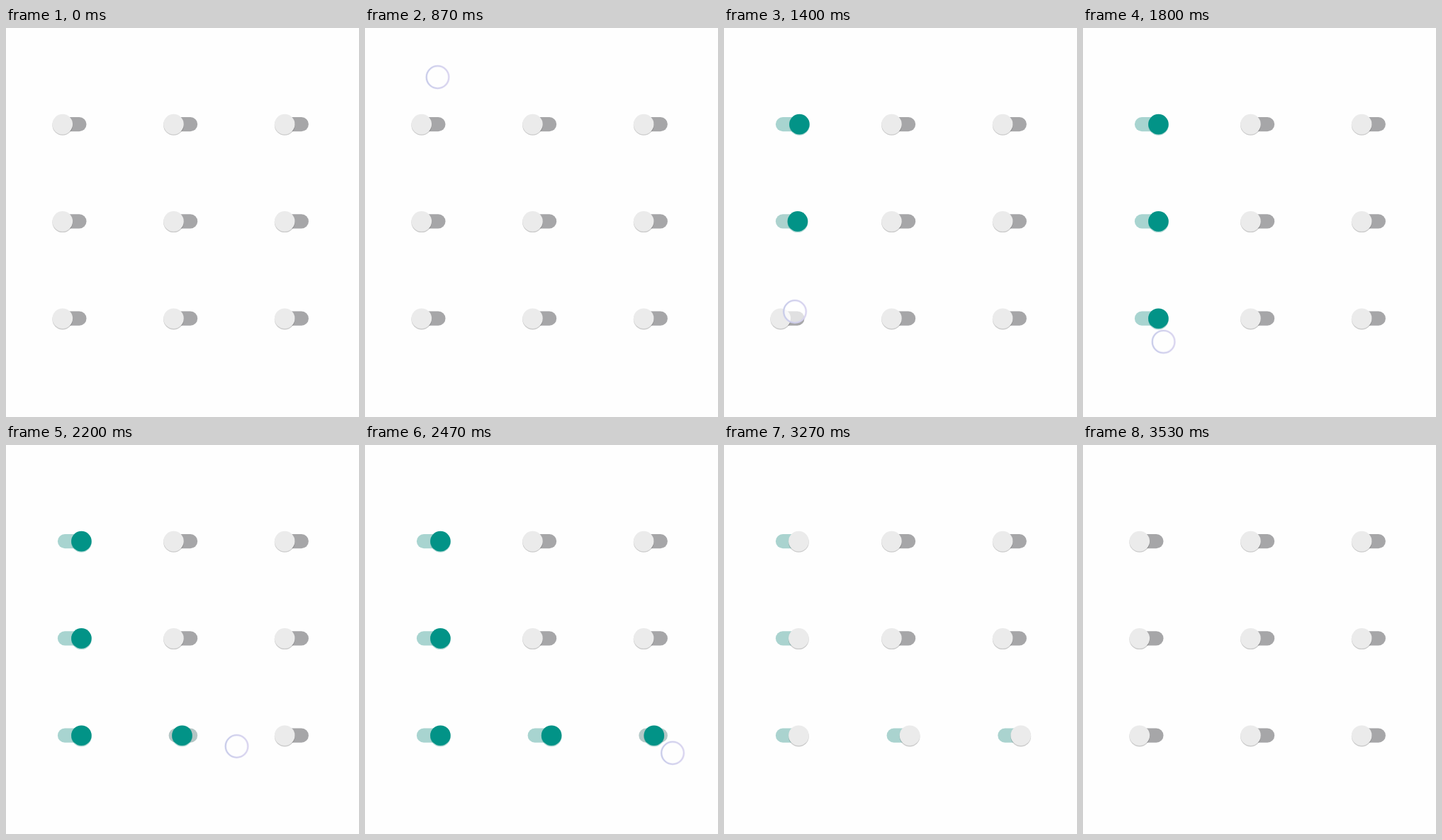
An HTML page with a canvas for the animation above (3.59 s loop, 498 by 550 pixels).

```html
<!DOCTYPE html>
<html lang="en">
<head>
<meta charset="utf-8">
<title>Toggle switches</title>
<style>
  html, body { margin: 0; width: 100%; height: 100%; overflow: hidden; background: #fefefe; }
  canvas { display: block; width: 498px; height: 550px; }
</style>
</head>
<body>
<canvas></canvas>
<script>
const W = 498, H = 550, LOOP = 3590, STEP = 1000 / 15;
const SLIDE = 250, RESET = 3235;

const canvas = document.querySelector('canvas');
const ctx = canvas.getContext('2d');
const ratio = window.devicePixelRatio || 1;
canvas.width = W * ratio;
canvas.height = H * ratio;
ctx.scale(ratio, ratio);

// Switch-on times by row and column; null stays off
const onTimes = [
  [1020, null, null],
  [1199, null, null],
  [1450, 2083, 2334]
];

// Pointer path: step, x, y
const path = [
  [13, 102.5, 69.5], [15, 105, 126], [17, 106, 238], [19, 104, 348],
  [21, 100, 401], [24, 103, 435], [28, 124, 445], [30, 186, 445.5],
  [33, 325.5, 426], [36, 403, 431], [37, 434, 435.5], [39, 460, 437],
  [41, 465, 437]
];

const ease = t => (1 - Math.cos(Math.PI * Math.min(1, Math.max(0, t)))) / 2;
const mix = (a, b, p) => a + (b - a) * p;

function slope(i, axis) {
  const a = path[Math.max(0, i - 1)];
  const b = path[Math.min(path.length - 1, i + 1)];
  return (b[axis] - a[axis]) / (b[0] - a[0]);
}

function along(step, axis) {
  let i = 0;
  while (i < path.length - 2 && step >= path[i + 1][0]) i++;
  const a = path[i], b = path[i + 1], span = b[0] - a[0];
  const u = (step - a[0]) / span, v = 1 - u;
  return v * v * (1 + 2 * u) * a[axis] + u * u * (3 - 2 * u) * b[axis]
    + span * u * v * (v * slope(i, axis) - u * slope(i + 1, axis));
}

function disc(x, y, r, fill) {
  ctx.beginPath();
  ctx.arc(x, y, r, 0, 2 * Math.PI);
  ctx.fillStyle = fill;
  ctx.fill();
}

function drawSwitch(x, y, on, p) {
  const [r, g, b] = [[166, 168], [166, 212], [168, 208]].map(c => mix(c[0], c[1], p));
  ctx.fillStyle = `rgba(${r}, ${g}, ${b}, ${1 - 0.6 * p * (1 - p)})`;
  ctx.beginPath();
  ctx.roundRect(x - 20.3, y - 10.1, 40.6, 20.2, 10.1);
  ctx.fill();

  const thumb = x + mix(-13.4, 13.2, p);
  disc(thumb, y + 1.3, 14.4, on ? 'rgba(0, 130, 118, .32)' : 'rgba(0, 0, 0, .2)');
  disc(thumb, y, 14.3, on ? '#029387' : '#ebebeb');
}

function drawPointer(x, y) {
  disc(x, y, 16, 'rgba(255, 255, 255, .65)');
  const shade = ctx.createLinearGradient(x - 16, y, x + 16, y);
  shade.addColorStop(0, '#c6cae8');
  shade.addColorStop(1, '#d9d3ee');
  ctx.beginPath();
  ctx.arc(x, y, 15.8, 0, 2 * Math.PI);
  ctx.strokeStyle = 'rgba(205, 205, 240, .3)';
  ctx.lineWidth = 3.4;
  ctx.stroke();
  ctx.strokeStyle = shade;
  ctx.lineWidth = 1.8;
  ctx.stroke();
}

function draw(now) {
  // Hold each pose for one step of the 15 per second clock
  const step = Math.floor((now % LOOP + 4) / STEP);
  const time = step * STEP;

  ctx.fillStyle = '#fefefe';
  ctx.fillRect(0, 0, W, H);

  onTimes.forEach((row, j) => row.forEach((start, i) => {
    const used = start !== null;
    const on = used && time >= start && time < RESET;
    const p = used ? ease((time - start) / SLIDE) - ease((time - RESET) / SLIDE) : 0;
    drawSwitch(93.2 + 156.7 * i, 136.1 + 137.3 * j, on, p);
  }));

  if (step >= 13 && step < 42) drawPointer(along(step, 1), along(step, 2));
}

let origin = null;
function tick(now) {
  if (origin === null) origin = now;
  draw(now - origin);
  requestAnimationFrame(tick);
}
draw(0);
requestAnimationFrame(tick);
</script>
</body>
</html>
```
